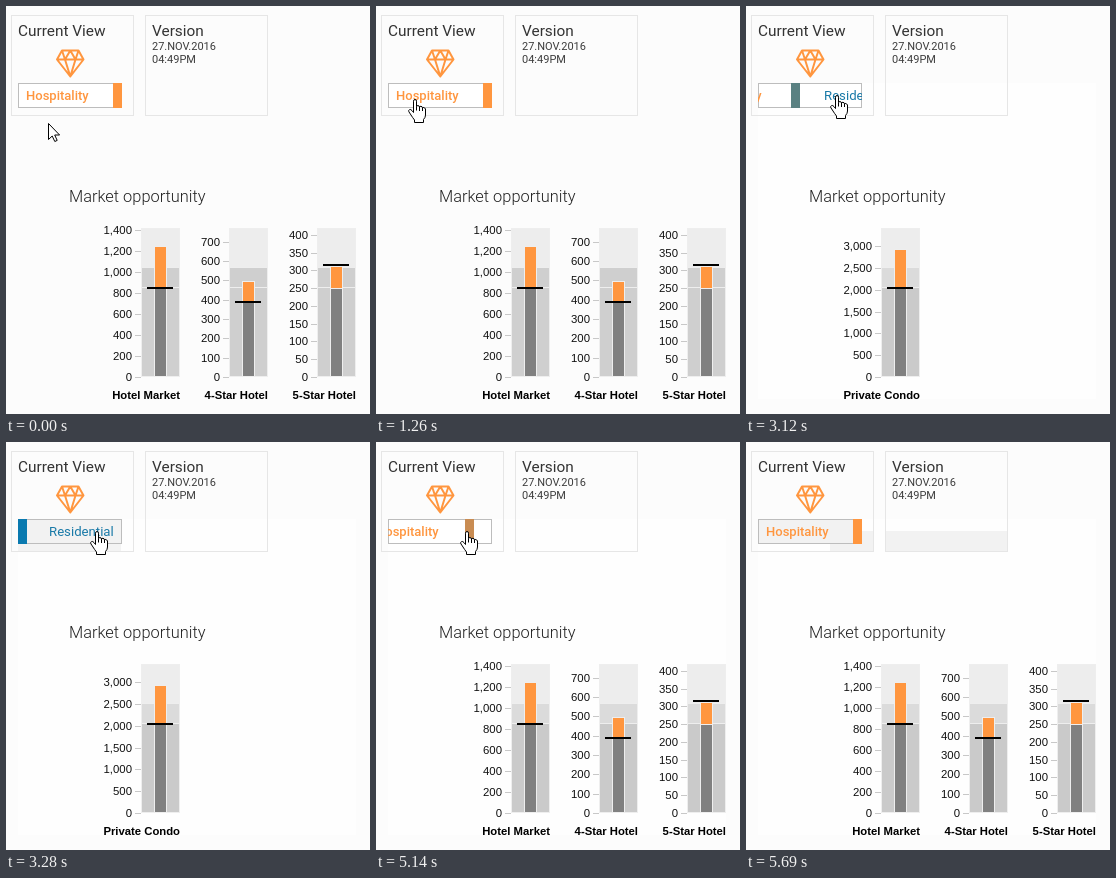
Write an HTML page that moves like this. It is 364 px wide and 408 px high and loops after 6.89 s.

```html
<!DOCTYPE html>
<html lang="en">
<head>
<meta charset="utf-8">
<title>Market dashboard</title>
<style>
html, body { margin: 0; width: 100%; height: 100%; overflow: hidden; background: #fcfcfc; }
svg { display: block; width: 364px; height: 408px; }
text { font-family: Roboto, sans-serif; fill: #3c3c3c; }
.title { font-size: 15.4px; fill: #333; }
.date { font-size: 11px; }
.heading { font-size: 16.4px; font-weight: 300; fill: #222; }
.option { font-size: 13.2px; }
.axis { font: 11.4px "Liberation Sans", Arial, sans-serif; fill: #111; text-anchor: end; }
.name { font: bold 11.3px "Liberation Sans", Arial, sans-serif; fill: #000; text-anchor: end; }
.card { fill: none; stroke: #e6e6e6; }
.top { fill: #ededed; }
.top, .mid, .low, .value { stroke: #eee; }
.gem { fill: none; stroke: #ff963f; stroke-width: 2; stroke-linejoin: round; }
.hand, .arrow { fill: #fff; stroke: #000; }

.pane, .shade, .patch, .box, .mid, .low, .hotels, .condo,
.first, .second, .bar, .pointer, .hand, .arrow {
  animation: 6890ms step-end infinite;
}
.pane { animation-name: pane; }
.shade { animation-name: shade; }
.patch { animation-name: patch; }
.box { animation-name: box; }
.mid { animation-name: mid; }
.low { animation-name: low; }
.hotels { animation-name: hotels; }
.condo { animation-name: condo; }
.first { animation-name: first; font-size: 13px; font-weight: 500; }
.second { animation-name: second; }
.bar { animation-name: bar; }
.pointer { animation-name: pointer; }
.hand { animation-name: hand; }
.arrow { animation-name: arrow; }

@keyframes pane { 0% { opacity: 0 } 45.28%, 100% { opacity: 1 } }
@keyframes shade { 0% { opacity: 0 } 47.6% { opacity: 1 } 74.6%, 100% { opacity: 0 } }
@keyframes patch { 0% { opacity: 0 } 80.84%, 100% { opacity: 1 } }
@keyframes box {
  0% { fill: #fff } 47.6% { fill: #f2f2f2 } 74.6% { fill: #fff } 76.34%, 100% { fill: #f2f2f2 }
}
@keyframes mid { 0% { fill: #cfcfcf } 45.28%, 100% { fill: #dbdbdb } }
@keyframes low { 0% { fill: #cfcfcf } 45.28%, 100% { fill: #cacaca } }
@keyframes hotels { 0% { opacity: 1 } 45.28% { opacity: 0 } 74.6%, 100% { opacity: 1 } }
@keyframes condo { 0% { opacity: 0 } 45.28% { opacity: 1 } 74.6%, 100% { opacity: 0 } }
@keyframes first {
  0% { transform: none }
  45.28% { transform: translateX(-67px) }
  47.6% { transform: translateX(-103px) }
  74.6% { transform: translateX(-20px) }
  76.34%, 100% { transform: none }
}
@keyframes second {
  0% { transform: translateX(100px) }
  45.28% { transform: translateX(35px) }
  47.6% { transform: none }
  74.6% { transform: translateX(82px) }
  76.34%, 100% { transform: translateX(100px) }
}
@keyframes bar {
  0% { transform: none; fill: #ff963f }
  45.28% { transform: translateX(-62px); fill: #5a8182 }
  47.6% { transform: translateX(-95px); fill: #0a7ab0 }
  74.6% { transform: translateX(-18px); fill: #c98c52 }
  76.34%, 100% { transform: none; fill: #ff963f }
}
@keyframes pointer {
  0% { transform: translate(42px, 117px) }
  6.24% { transform: translate(38px, 103px) }
  8.41% { transform: translate(32px, 98px) }
  10.59% { transform: translate(32px, 94px) }
  18.28% { transform: translate(32px, 93px) }
  43.25% { transform: translate(45px, 92px) }
  45.28% { transform: translate(84px, 89px) }
  80.84%, 100% { transform: translate(251px, 275px) }
}
@keyframes hand { 0% { opacity: 0 } 8.41% { opacity: 1 } 80.84%, 100% { opacity: 0 } }
@keyframes arrow {
  0% { opacity: 1 } 8.41% { opacity: 0 } 80.84% { opacity: 1 } 82.58%, 100% { opacity: 0 }
}
</style>
</head>
<body>
<svg viewBox="0 0 364 408">
  <defs><clipPath id="slot"><rect x="12" y="77" width="104" height="25"/></clipPath></defs>
  <rect class="pane" x="12" y="77" width="338" height="316" fill="#fefefe"/>
  <rect class="shade" x="12" y="77" width="103" height="32" fill="#f3f3f3"/>
  <path class="patch" d="M84 89h44v20h-44zM140 89h122v20h-122z" fill="#f2f2f2"/>

  <rect class="card" x="5.5" y="9.5" width="122" height="100"/>
  <rect class="card" x="139.5" y="9.5" width="122" height="100"/>
  <text class="title" x="12" y="30">Current View</text>
  <text class="title" x="146" y="30">Version</text>
  <text class="date" x="146" y="44">27.NOV.2016</text>
  <text class="date" x="146" y="57">04:49PM</text>
  <path class="gem" d="M56 44.5H72.5L77.5 53.5L64.3 70.5L51 53.5ZM51 53.5H77.5M56 44.5L59 53.5L64.3 44.5L69.5 53.5L72.5 44.5M59 53.5L64.3 70.5L69.5 53.5"/>

  <rect class="box" x="12.5" y="77.5" width="103" height="24" stroke="#bdbdbd"/>
  <g clip-path="url(#slot)">
    <text class="option first" x="20" y="94" style="fill:#ff963f">Hospitality</text>
    <text class="option second" x="43" y="94" style="fill:#1a7aa8">Residential</text>
    <rect class="bar" x="107" y="77" width="9" height="25"/>
  </g>

  <text class="heading" x="63" y="196">Market opportunity</text>
  <g class="hotels"></g>
  <g class="condo"></g>

  <g class="pointer">
    <path class="arrow" d="M.5 .5V16.5L4.2 13L6.8 18.5L9.2 17.4L6.7 12H11.6Z"/>
    <path class="hand" d="M5.5 13.5V2.2Q5.5 .5 7 .5T8.5 2.2V7.5Q8.6 6.6 10 6.6T11.5 8Q11.6 7.2 13 7.3T14.5 9Q14.8 8.3 15.8 8.5T17.5 10V16Q17.5 18.5 15.5 20.5V23.5H6.5V21Q4.5 18.5 3 16L.9 12.8Q.2 11.2 1.5 10.6T4 11.6ZM8.5 7.5v4M11.5 8v4M14.5 9v3"/>
  </g>
</svg>
<script>
const BASE = 371;

function rect(x, y, w, h, attrs) {
  return `<rect x="${x}" y="${y}" width="${w}" height="${h}" ${attrs}/>`;
}

// Outlined box whose one-pixel edge falls on whole pixels
function cell(x, y, w, bottom, attrs) {
  return rect(x + .5, y + .5, w - 1, bottom - y, attrs);
}

// x: left edge of the column; top, split, goal: heights of bar, colour change and target
function chart({ name, x, count, unit, step, top, split, goal }) {
  let out = cell(x, 222, 39, 261, 'class="top"')
    + cell(x, 261, 39, 281, 'class="mid"')
    + cell(x, 281, 39, BASE - 1, 'class="low"');
  for (let i = 0; i <= count; i++) {
    const y = Math.round(BASE - i * step);
    out += `<text class="axis" x="${x - 9}" y="${y + 4}">${(i * unit).toLocaleString('en-US')}</text>`
      + rect(x - 6, y, 6, 1, 'fill="#c8c8c8"');
  }
  out += cell(x + 13, top, 13, split, 'class="value" fill="#ff963f"')
    + cell(x + 13, split, 13, BASE - 1, 'class="value" fill="#808080"')
    + rect(x + 6, goal - 1, 26, 2, 'fill="#000"');
  return out + `<text class="name" x="${x + 39}" y="393">${name}</text>`;
}

const hotels = [
  { name: 'Hotel Market', x: 135, count: 7, unit: 200, step: 21, top: 240, split: 282, goal: 282 },
  { name: '4-Star Hotel', x: 223, count: 7, unit: 100, step: 19.35, top: 275, split: 296, goal: 296 },
  { name: '5-Star Hotel', x: 311, count: 8, unit: 50, step: 17.78, top: 260, split: 282, goal: 259 }
];
const condo = { name: 'Private Condo', x: 135, count: 6, unit: 500, step: 21.8, top: 243, split: 282, goal: 282 };

document.querySelector('.hotels').innerHTML = hotels.map(chart).join('');
document.querySelector('.condo').innerHTML = chart(condo);
</script>
</body>
</html>
```
